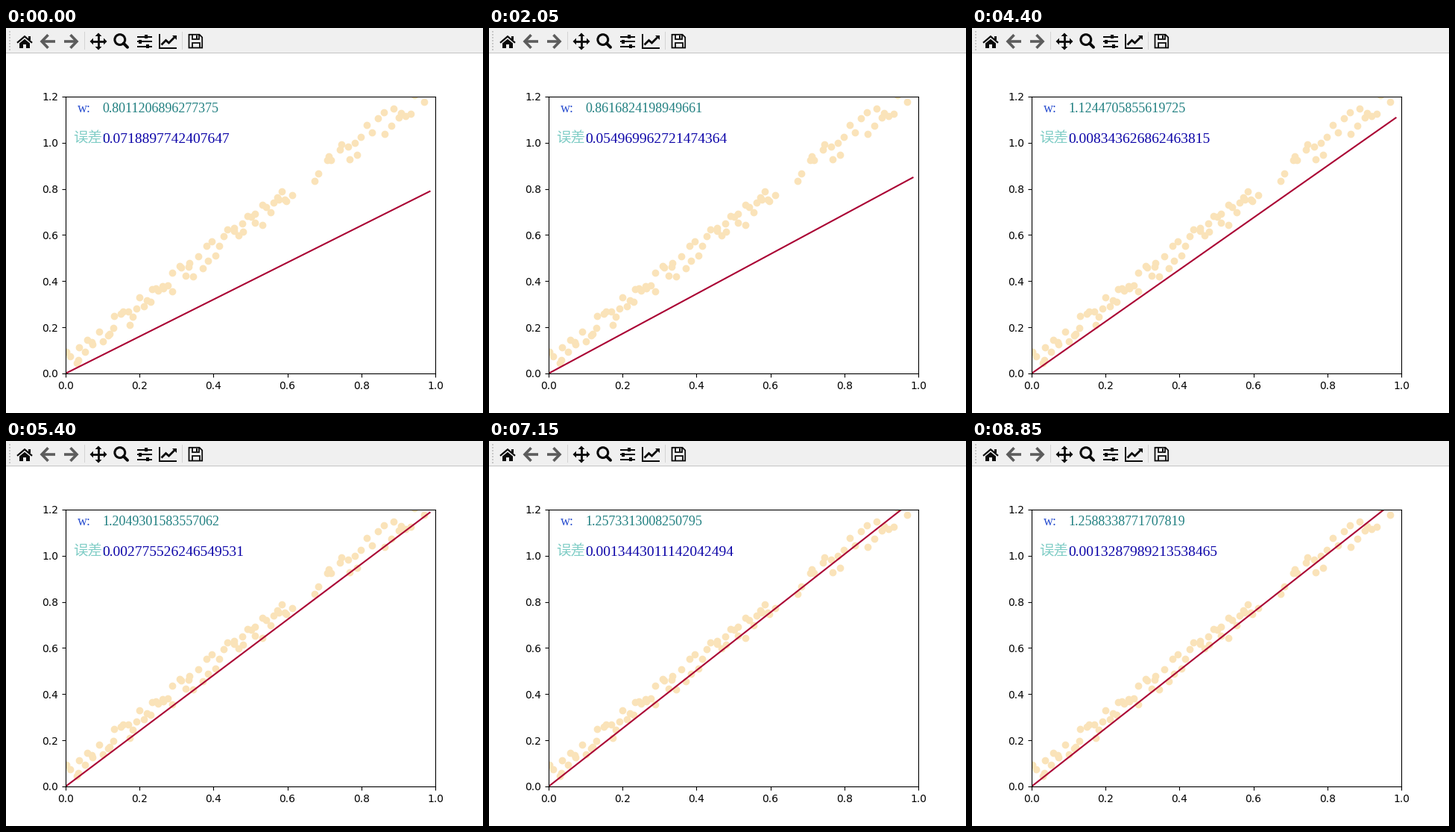
A matplotlib script for the animation above (9.05 s loop, 640 by 516 pixels).

```python
import numpy as np
import matplotlib.pyplot as plt
from matplotlib.animation import FuncAnimation
from matplotlib.patches import Circle, Polygon, Rectangle

W, H, DPI = 640, 516, 100
STEP, LOOP = 50, 9050
PLOT_H = 482  # plot canvas below the toolbar
INK, GREY, PANEL = "#0a0a0a", "#5c5c5c", "#f0f0f0"

# Key moments of the training: time (ms) and weight
T = np.array([0, 2050, 3050, 4400, 5400, 7150, 8850])
WEIGHT = np.array([0.8011206896277375, 0.8616824198949661, 0.9538697156264692,
                   1.1244705855619725, 1.2049301583557062, 1.2573313008250795,
                   1.2588338771707819])
# Squared error is a parabola in the weight, so three values define it
LOSS = np.polyfit(WEIGHT[::3], [0.07188977424076491, 0.008343626862464277,
                                0.0013287989213542145], 2)
PAUSE = 150
PAUSES = (1900, 3050, 4150, 5150, 7850, 8100, 8600)

fig = plt.figure(figsize=(W / DPI, H / DPI), dpi=DPI, facecolor="white")
bar = fig.add_axes([0, 0, 1, 1])
bar.set(xlim=(0, W), ylim=(H, 0))
bar.axis("off")


def stroke(points, width=2.0, color=INK, cap="butt"):
    x, y = zip(*points)
    bar.plot(x, y, color=color, lw=width * 72 / DPI, solid_capstyle=cap,
             solid_joinstyle="miter")


def fill(points):
    bar.add_patch(Polygon(points, closed=True, fc=INK, ec="none"))


def box(x, y, w, h, color=INK):
    bar.add_patch(Rectangle((x, y), w, h, fc=color, ec="none"))


def draw_home():
    stroke([(15, 19.8), (25, 11.3), (35, 19.8)], 2.2)
    box(30, 11, 3, 5)
    fill([(18, 20.5), (25, 14.8), (32, 20.5), (32, 27), (27, 27), (27, 22),
          (23, 22), (23, 27), (18, 27)])


def draw_arrow(cx, way):
    tip = cx + 8 * way
    stroke([(tip - way, 18), (cx - 9.5 * way, 18)], 3.6, GREY)
    stroke([(tip - 8.5 * way, 9.2), (tip, 18), (tip - 8.5 * way, 26.8)], 3.6, GREY)


def draw_move(cx=124, cy=18):
    for dx, dy in [(1, 0), (-1, 0), (0, 1), (0, -1)]:
        stroke([(cx, cy), (cx + 8 * dx, cy + 8 * dy)], 2.8)
        fill([(cx + 11.5 * dx, cy + 11.5 * dy),
              (cx + 7 * dx + 4.4 * dy, cy + 7 * dy + 4.4 * dx),
              (cx + 7 * dx - 4.4 * dy, cy + 7 * dy - 4.4 * dx)])


def draw_zoom():
    bar.add_patch(Circle((152.8, 15.6), 6.9, fc="none", ec=INK, lw=2.2))
    stroke([(157.8, 20.6), (163, 25.8)], 4, cap="round")


def draw_sliders():
    for y, knob in [(11.5, 188), (18, 180), (24.5, 190)]:
        stroke([(176, y), (196, y)], 2)
        box(knob - 3, y - 3, 6, 6, PANEL)
        box(knob - 2, y - 2.5, 4, 5)


def draw_chart():
    stroke([(206, 8), (206, 26.5), (229, 26.5)], 2)
    stroke([(208.5, 22.5), (214.5, 16.5), (218.5, 20), (226, 12.5)], 2.8)
    fill([(222.5, 10), (228.5, 10), (228.5, 16)])


def draw_disk():
    stroke([(245.5, 8.8), (259.5, 8.8), (263.2, 12.5), (263.2, 26.5),
            (245.5, 26.5), (245.5, 8)], 1.8)
    stroke([(249.5, 9), (249.5, 14.8), (258.5, 14.8), (258.5, 9)], 1.8)
    box(254.5, 9.5, 2.5, 4)
    stroke([(249.5, 26), (249.5, 20), (259.5, 20), (259.5, 26)], 1.8)


def draw_toolbar():
    box(0, 0, W, 33, PANEL)
    box(0, 33, W, 1, "#c4c4c4")
    for y in range(4, 31, 4):
        box(4, y, 2, 2, "#c8c8c8")
    for x in (105, 236):
        box(x, 5, 1, 24, "#d4d4d4")
    draw_home()
    draw_arrow(56, -1)
    draw_arrow(87, 1)
    draw_move()
    draw_zoom()
    draw_sliders()
    draw_chart()
    draw_disk()


def make_samples(count=94):
    """Noisy samples of y = 1.2 x, denser on the left, with one gap."""
    rng = np.random.default_rng(4)
    x = np.interp(np.arange(count), [0, 20, 36, 50, 67, 68, 93],
                  [0.004, 0.194, 0.329, 0.468, 0.609, 0.676, 0.972])
    x = np.abs(x + rng.normal(0, 0.004, count))
    return x, 1.2 * x + rng.uniform(0, 0.1, count)


draw_toolbar()

ax = fig.add_axes([0.125, 0.11 * PLOT_H / H, 0.775, 0.77 * PLOT_H / H])
ax.set(xlim=(0, 1), ylim=(0, 1.2))
ax.scatter(*make_samples(), color="#fae3b9")
line_x = np.array([0.002, 0.985])
fit, = ax.plot(line_x, line_x, color="#aa0033", lw=1.5)

serif = dict(family="Liberation Serif")
ax.text(0.033, 1.13, "w:", size=13, color="#2a4fd0", **serif)
ax.text(0.02, 1.0, "误差:", size=14, color="#80cdc6", family="Noto Sans CJK JP")
weight_text = ax.text(0.1, 1.13, "", size=13, color="#1f7f80", **serif)
loss_text = ax.text(0.1, 1.0, "", size=14, color="#0c04a8", **serif)

# Harmonic-mean slopes keep the curve smooth and free of overshoot
rate = np.diff(WEIGHT) / np.diff(T)
SLOPE = np.r_[0, 2 / (1 / rate[:-1] + 1 / rate[1:]), 0]


def weight_at(t):
    """Cubic Hermite curve through the key moments."""
    i = min(np.searchsorted(T, t, side="right") - 1, len(T) - 2)
    span = T[i + 1] - T[i]
    u = min((t - T[i]) / span, 1)
    s = u * u * (3 - 2 * u)
    bend = u * (1 - u) * ((1 - u) * SLOPE[i] - u * SLOPE[i + 1])
    return float(WEIGHT[i] * (1 - s) + WEIGHT[i + 1] * s + bend * span)


def update(frame):
    t = frame * STEP
    for start in PAUSES:
        if start <= t < start + PAUSE:
            t = start
    w = weight_at(t)
    fit.set_ydata(w * line_x)
    weight_text.set_text(repr(w))
    loss_text.set_text(repr(float(np.polyval(LOSS, w))))
    return fit, weight_text, loss_text


anim = FuncAnimation(fig, update, frames=LOOP // STEP, interval=STEP,
                     repeat=True, repeat_delay=0)
plt.show()
```
